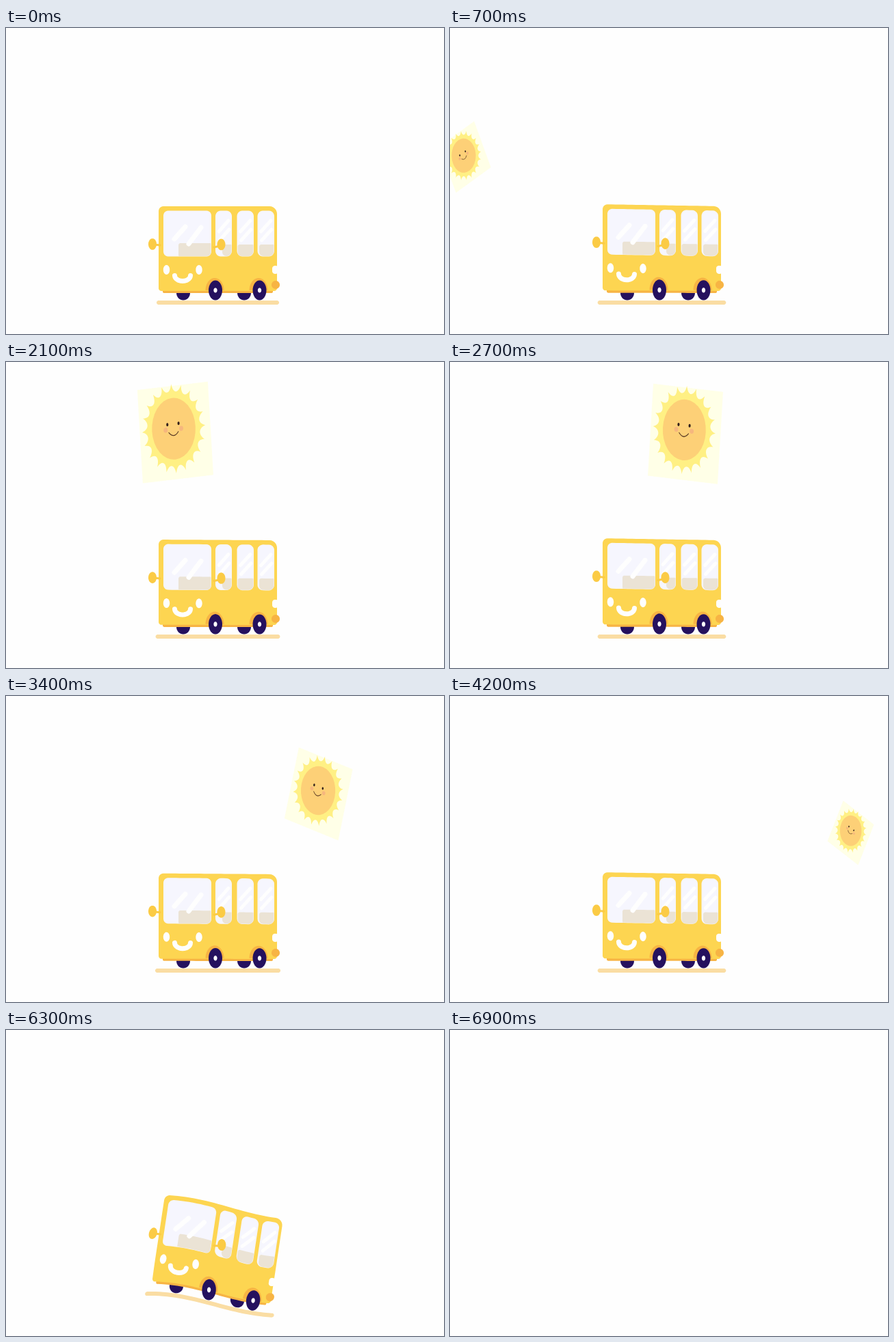
Write an HTML page with a canvas that moves like this. It is 640x448 px and loops after 8000 ms.

```html
<!DOCTYPE html>
<html lang="en">
<head>
<meta charset="utf-8">
<title>Sunny bus</title>
<style>
  html, body { margin: 0; width: 100%; height: 100%; overflow: hidden; background: #fefefe; }
  canvas { display: block; width: 640px; height: 448px; }
</style>
</head>
<body>
<canvas id="stage" width="640" height="448"></canvas>
<script>
const ctx = document.getElementById('stage').getContext('2d');
const LOOP = 8000, STEP = 100, TAU = Math.PI * 2;
const YELLOW = '#fdd551', AMBER = '#f7b444', GLASS = '#f6f6fe', SEAT = '#ebe3d5',
      NAVY = '#25115e', WHITE = '#fefefe';

// Jelly sway before the bus leaves: [time, amount]
const SWAY = [[5400, 0], [5700, -1.1], [6000, 1.9], [6300, 1], [6900, 0.7]];

const clamp = v => Math.min(1, Math.max(0, v));
let bob = 0, sway = 0, shift = 0;

function track(keys, t) {
  if (t <= keys[0][0]) return keys[0][1];
  for (let i = 1; i < keys.length; i++) {
    const [t0, a] = keys[i - 1], [t1, b] = keys[i];
    if (t <= t1) {
      const p = (t - t0) / (t1 - t0);
      return a + (b - a) * p * p * (3 - 2 * p);
    }
  }
  return keys[keys.length - 1][1];
}

// Bends the resting bus into its current pose
function warp([x, y]) {
  const lift = 3.2 * bob * clamp((392 - y) / 30) * clamp((400 - x) / 170);
  return [
    x + shift + sway * (9 - 19 * (y - 262) / 126),
    y - lift + sway * 16 * Math.sin(Math.PI * (x - 318) / 190)
  ];
}

function trace(points, closed) {
  ctx.beginPath();
  const n = points.length;
  for (let i = 0; i < (closed ? n : n - 1); i++) {
    const a = points[i], b = points[(i + 1) % n];
    const parts = Math.ceil(Math.hypot(b[0] - a[0], b[1] - a[1]) / 6) || 1;
    for (let k = i ? 1 : 0; k <= parts; k++) {
      const p = k / parts;
      ctx.lineTo(...warp([a[0] + (b[0] - a[0]) * p, a[1] + (b[1] - a[1]) * p]));
    }
  }
}

function fill(points, color) {
  trace(points, true);
  ctx.fillStyle = color;
  ctx.fill();
}

function stroke(points, color, width) {
  trace(points, false);
  ctx.lineCap = ctx.lineJoin = 'round';
  ctx.strokeStyle = color;
  ctx.lineWidth = width;
  ctx.stroke();
}

function arc(x, y, rx, ry, from, to, n) {
  return Array.from({ length: n + 1 }, (_, i) => {
    const a = from + (to - from) * i / n;
    return [x + rx * Math.cos(a), y + ry * Math.sin(a)];
  });
}

const oval = (x, y, rx, ry, color) => fill(arc(x, y, rx, ry, 0, TAU, 32), color);

function box(l, t, r, b, color, tl, tr = tl, br = tl, bl = tl) {
  const corner = (x, y, rad, q) => arc(x, y, rad, rad, q * TAU / 4, (q + 1) * TAU / 4, 6);
  fill([
    ...corner(l + tl, t + tl, tl, 2), ...corner(r - tr, t + tr, tr, 3),
    ...corner(r - br, b - br, br, 0), ...corner(l + bl, b - bl, bl, 1)
  ], color);
}

function wheel(x) {
  oval(x, 384, 10, 14.5, NAVY);
  oval(x, 384, 2.6, 3.6, WHITE);
}

function drawBus(t) {
  bob = (1 - Math.cos(TAU * (t - 10) / 500)) / 2;
  sway = track(SWAY, t);
  shift = -420 * clamp((t - 6300) / 600) ** 2;

  box(220 - 5 * bob, 399, 399 + 5 * bob, 405, '#fadda3', 3);
  oval(259, 388, 10, 10.5, NAVY);
  oval(348, 388, 10, 10.5, NAVY);
  box(229, 376, 390, 388, AMBER, 2);
  box(223, 261, 396, 385, YELLOW, 7, 11, 4, 4);

  for (const x of [306, 370]) {
    fill(arc(x - 1, 384, 13.5, 18, Math.PI, TAU, 20), AMBER);
  }

  box(230, 267.5, 300, 334.5, GLASS, 7);
  box(252, 315, 299.5, 334, SEAT, 3, 1, 6, 1);
  stroke([[246, 309], [262, 291]], WHITE, 7);
  stroke([[267, 316], [285, 292]], WHITE, 7);

  for (const [l, r, seat] of [[306, 330, 316], [337.5, 362, 338.5], [367.5, 392, 370]]) {
    box(l, 267.5, r, 334.5, GLASS, 8);
    box(seat, 317, r - 0.5, 334, SEAT, 3, 1, 7, 6);
    stroke([[l + 5, 298], [r - 5, 282]], WHITE, 5);
    stroke([[l + 6, 311], [r - 4, 295]], WHITE, 5);
  }

  stroke([[216, 317], [225, 318]], '#fbcb45', 3);
  oval(214, 316.5, 6, 8.3, '#fbcb45');
  stroke([[304, 321], [313, 319]], '#fbcb45', 3);
  oval(314.5, 317, 6, 8.3, '#fbcb45');

  oval(234.5, 354, 4.7, 7, WHITE);
  oval(282, 354, 4.7, 7, WHITE);
  stroke(arc(258, 362.5, 11.5, 8, Math.PI, 0, 14), WHITE, 7);

  box(389, 348, 398, 360, WHITE, 4);
  oval(394, 376, 6, 6, AMBER);
  wheel(306);
  wheel(370.5);

  const puff = t % 700;
  if (puff >= 100 && puff <= 450) {
    const p = (puff - 100) / 350;
    oval(394 + 7 * p, 371 - 16 * p, 3, 3.6, '#dcd9e6');
  }
}

function disc(x, y, rx, ry, color) {
  ctx.beginPath();
  ctx.ellipse(x, y, rx, ry, 0, 0, TAU);
  ctx.fillStyle = color;
  ctx.fill();
}

function drawSun(t) {
  if (t < 100 || t > 5000) return;
  const fall = 1 - Math.cos(0.001216 * (t - 2360));
  const size = 1.01 - 0.32 * fall;
  ctx.save();
  ctx.translate(102.5 + 0.161 * (t - 1200), 100 + 62 * fall);
  ctx.scale(size, size * 1.42);
  ctx.rotate(0.016 * (t - 2400) * Math.PI / 180);

  ctx.fillStyle = '#ffffe7';
  ctx.fillRect(-52, -48.5, 104, 97);
  ctx.translate(-2, -4);

  // Pointed rays with rounded valleys
  const rays = 20;
  ctx.beginPath();
  for (let i = 0; i <= rays; i++) {
    const at = (k, r) => [r * Math.cos(k * TAU / rays), r * Math.sin(k * TAU / rays)];
    if (i) ctx.bezierCurveTo(...at(i - 0.8, 36.5), ...at(i - 0.2, 36.5), ...at(i, 46.5));
    else ctx.moveTo(...at(0, 46.5));
  }
  ctx.fillStyle = '#fff084';
  ctx.fill();

  disc(0, 0, 32, 32, '#fdd077');
  disc(-12, 0.5, 3, 2.6, '#f6b77e');
  disc(11, 0.5, 3, 2.6, '#f6b77e');
  disc(-9, -5, 1.6, 1.8, '#32201c');
  disc(7.5, -5, 1.6, 1.8, '#32201c');
  ctx.beginPath();
  ctx.moveTo(-7.5, 3.5);
  ctx.quadraticCurveTo(-0.5, 10.5, 6.5, 3.5);
  ctx.strokeStyle = '#5a3a24';
  ctx.lineWidth = 1;
  ctx.stroke();
  ctx.restore();
}

function draw(t) {
  ctx.fillStyle = WHITE;
  ctx.fillRect(0, 0, 640, 448);
  if (t >= 6900) return;
  drawSun(t);
  drawBus(t);
}

const start = performance.now();
function tick() {
  const t = (performance.now() - start) % LOOP;
  draw(Math.floor(t / STEP) * STEP);
  requestAnimationFrame(tick);
}
tick();
</script>
</body>
</html>
```
